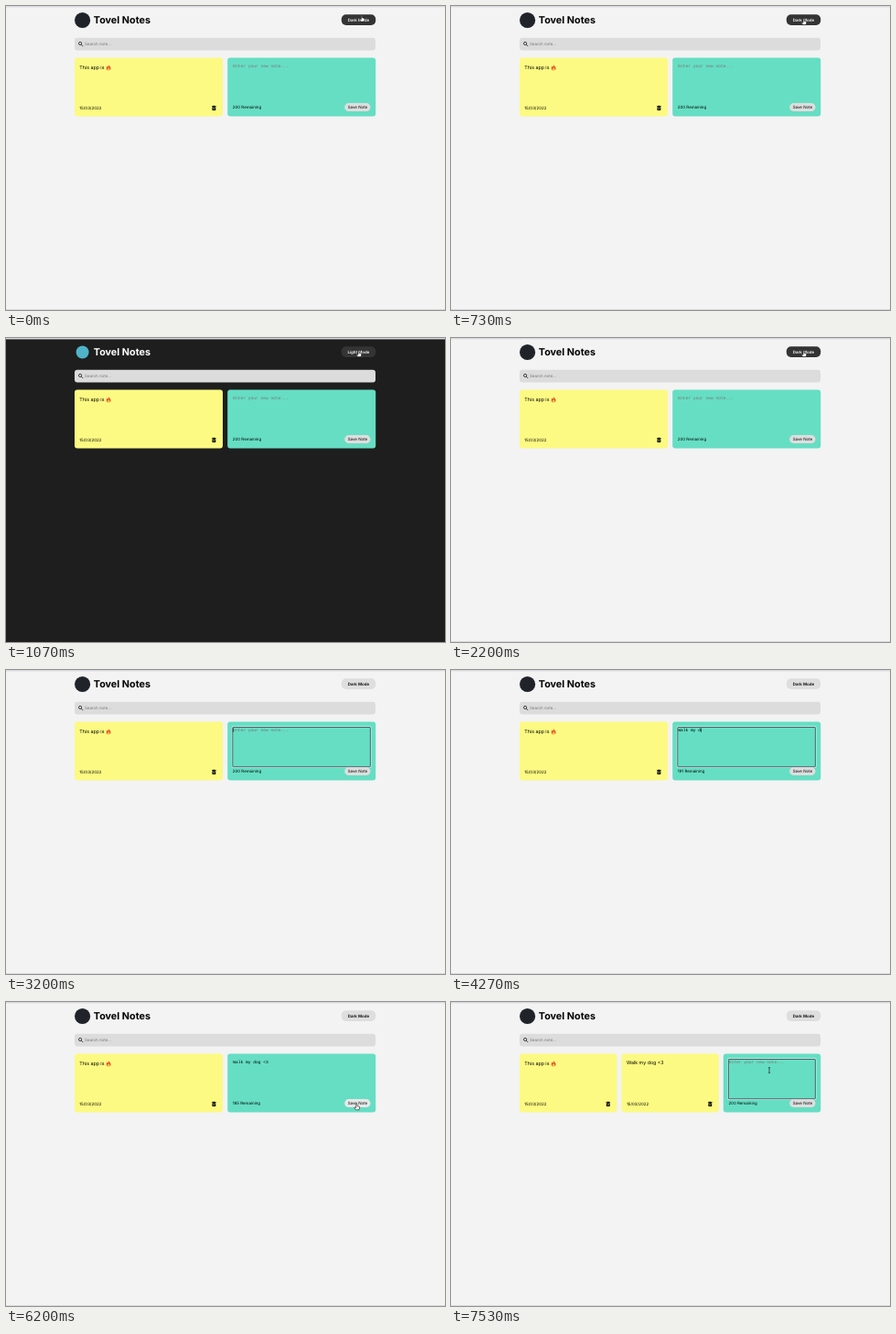
Recreate the animation shown at these times as an HTML page. Size 480 by 332 pixels, loop 8000 ms.

```html
<!DOCTYPE html>
<html lang="en">
<head>
<meta charset="utf-8">
<title>Notes</title>
<style>
  html, body { margin: 0; width: 100%; height: 100%; overflow: hidden; background: #f3f3f3; }
  svg { display: block; width: 100%; height: 100%; --bg: #f3f3f3; --ink: #000; --logo: #20232a; --line: #dadade; }
  svg.dark { --bg: #1e1e1e; --ink: #fff; --logo: #4fb4c8; --line: #1e1e1e; }
  text { font: 4.45px Inter, sans-serif; text-rendering: geometricPrecision; white-space: pre; fill: #000; }
  .title { font-size: 10.8px; font-weight: 700; fill: var(--ink); }
  .mid { text-anchor: middle; }
  .bold { font-weight: 600; }
  .body { font-size: 5.3px; }
  .mono { font: 4.6px "Liberation Mono", monospace; }
  .hint { fill: #757575; }
  .bg { fill: var(--bg); }
  .pill { fill: #dedede; }
  .note { fill: #fcfa82; }
</style>
</head>
<body>
<svg id="app" viewBox="0 0 480 332" preserveAspectRatio="none">
  <defs>
    <g id="trash">
      <path d="M-2.3-2.1H-1L-.6-2.6H.6L1-2.1H2.3V-1.4H-2.3ZM-1.9-1H1.9V2.2Q1.9 2.8 1.3 2.8H-1.3Q-1.9 2.8-1.9 2.2Z"/>
      <path d="M-.8.1.8 1.7M.8.1-.8 1.7" stroke="#fcfa82" stroke-width=".55"/>
    </g>
    <g id="flame">
      <path d="M3.1 0C3.5 1.5 5.4 2.3 5.4 4.2C5.4 5.6 4.3 6.4 3 6.4C1.6 6.4.5 5.5.5 4.1C.5 3 1.1 2.5 1.3 1.6C1.8 1.9 2 2.3 2.1 2.7C2.8 2 3.2 1.1 3.1 0Z" fill="#e8532f"/>
      <path d="M3.2 3C3.5 3.8 4.3 4.1 4.3 5C4.3 5.8 3.7 6.2 3 6.2C2.2 6.2 1.7 5.7 1.7 5C1.7 4.5 2 4.2 2.1 3.9L2.6 4.3Q3.1 3.8 3.2 3Z" fill="#fbc04b"/>
    </g>
  </defs>

  <rect class="bg" width="480" height="332"/>
  <rect width="480" height="1.4" fill="#d9d9de"/>
  <rect y="331" width="480" height="1" fill="var(--line)"/>

  <circle id="logo" cx="83.6" cy="15.5" r="8.6" fill="var(--logo)"/>
  <text class="title" x="95.8" y="19.4">Tovel Notes</text>
  <rect id="modeBtn" class="pill" x="366.8" y="9.2" width="37.4" height="11.8" rx="5"/>
  <text id="modeText" class="mid bold" x="385.4" y="16.7"></text>

  <rect x="75" y="34.8" width="329" height="13.7" rx="3" fill="#dcdcdc"/>
  <g fill="none" stroke="#111" stroke-width=".75">
    <circle cx="81.1" cy="40.9" r="1.6"/>
    <path d="M82.3 42.1 84.3 44.1"/>
  </g>
  <text class="hint" x="86" y="43.2">Search note...</text>

  <g>
    <rect class="note" id="card1" x="75" y="56.6" height="63.9" rx="3"/>
    <text class="body" x="80.3" y="69.1">This app is</text>
    <use href="#flame" x="109.2" y="63.9"/>
    <text x="80.3" y="112.9">15/03/2022</text>
    <use href="#trash" id="bin1" y="111.3"/>
  </g>
  <g id="added">
    <rect class="note" x="186.4" y="56.6" width="106.4" height="63.9" rx="3"/>
    <text class="body" x="192" y="67.6">Walk my dog &lt;3</text>
    <text x="192" y="112.9">15/03/2022</text>
    <use href="#trash" x="283.3" y="111.3"/>
  </g>

  <rect id="card2" y="56.6" height="63.9" rx="3" fill="#66dec3"/>
  <g id="entry">
    <text id="typed" class="mono" x="6" y="67.1"></text>
    <rect id="caret" y="63.4" width=".6" height="4.6"/>
    <text id="left" x="5.6" y="112.2"></text>
  </g>
  <rect id="saveBtn" class="pill" x="370.2" y="106.1" width="28.3" height="9" rx="4.5"/>
  <text class="mid" x="384.4" y="112.1">Save Note</text>
  <g id="ring" fill="none">
    <rect id="ringOut" y="62.1" height="44" rx=".8" stroke="#fff" stroke-opacity=".65" stroke-width="1.5"/>
    <rect id="ringIn" y="62.5" height="43.2" rx=".5" stroke="#27333f" stroke-width=".75"/>
  </g>

  <g id="pointer" stroke-linejoin="round">
    <path id="arrow" d="M0 0V5.8L1.4 4.6 2.3 6.6 3.2 6.2 2.3 4.3H4.1Z" fill="#000" stroke="#fff" stroke-width=".5"/>
    <path id="hand" d="M-.6.5Q0-.4.6.5V2.4L2.7 2.9Q3.3 3.1 3.2 3.8L2.6 6.6H-.9L-2.5 4.3Q-2.5 3.4-1.6 3.7L-.6 4.4Z" fill="#fff" stroke="#111" stroke-width=".6"/>
    <path id="beam" d="M-1.1-3Q0-3 0-2.3Q0-3 1.1-3M0-2.3V2.3M-1.1 3Q0 3 0 2.3Q0 3 1.1 3" fill="none" stroke="#222" stroke-width=".7"/>
  </g>
</svg>
<script>
const LOOP = 8000;
const DARK = [870, 2200], SAVED = 6330;
const FOCUS = [[2930, 6130], [7030, LOOP]];
const HIDDEN = [3200, 5470];
const MESSAGE = "Walk my dog <3 ";
const KEYS = [3270, 3400, 3470, 3600, 3670, 3800, 3870, 4000, 4200, 4330, 4400, 4530, 4930, 5070, 5200];
// pointer path: time, x, y
const PATH = [
  [70, 389, 10.5], [470, 385.6, 14], [2260, 385.6, 14], [2930, 369, 80],
  [5470, 369, 80], [5780, 395, 98], [6100, 383.4, 111.2], [6420, 383.4, 111.2], [7000, 348, 74.5]
];

const $ = id => document.getElementById(id);
const set = (id, attrs) => { for (const k in attrs) $(id).setAttribute(k, attrs[k]); };
const show = (id, on) => { $(id).style.display = on ? "" : "none"; };
const within = (t, [a, b]) => t >= a && t < b;
const inBox = (p, x, y, w, h) => p.x >= x && p.x <= x + w && p.y >= y && p.y <= y + h;

function pointerAt(t) {
  let i = PATH.findIndex(k => k[0] > t);
  if (i === 0) return { x: PATH[0][1], y: PATH[0][2] };
  if (i < 0) i = PATH.length - 1;
  const [t0, x0, y0] = PATH[i - 1], [t1, x1, y1] = PATH[i];
  const u = Math.min(1, (t - t0) / (t1 - t0));
  const e = u * u * (3 - 2 * u);
  return { x: x0 + (x1 - x0) * e, y: y0 + (y1 - y0) * e };
}

function drawCards(t) {
  const saved = t >= SAVED;
  const width = saved ? 106.4 : 162;
  const x = 404.2 - width;
  const count = saved ? 0 : KEYS.filter(k => k <= t).length;
  const focus = FOCUS.find(f => within(t, f));

  set("card1", { width });
  set("bin1", { x: 75 + width - 9.6 });
  show("added", saved);
  set("card2", { x, width });
  set("entry", { transform: `translate(${x} 0)` });
  $("typed").textContent = count ? MESSAGE.slice(0, count) : "Enter your new note...";
  $("typed").classList.toggle("hint", !count);
  $("left").textContent = `${200 - count} Remaining`;

  show("ring", focus);
  set("ringOut", { x: x + 5.2, width: width - 10.6 });
  set("ringIn", { x: x + 5.6, width: width - 11.4 });
  const since = focus ? t - (count ? KEYS[count - 1] : focus[0]) : 0;
  show("caret", focus && since % 1000 < 500);
  set("caret", { x: 6 + count * 2.76 });
  return x;
}

function drawPointer(t, cardX) {
  const p = pointerAt(t);
  const onMode = inBox(p, 366.8, 9.2, 37.4, 11.8);
  const onSave = inBox(p, 370.2, 106.1, 28.3, 9);
  const onText = inBox(p, cardX + 5, 62, 399 - cardX - 5, 44);
  set("pointer", { transform: `translate(${p.x} ${p.y})` });
  show("pointer", !within(t, HIDDEN));
  show("hand", onMode || onSave);
  show("beam", onText && !onSave);
  show("arrow", !onMode && !onSave && !onText);
  $("modeBtn").style.fill = onMode ? "#343434" : "";
  $("modeText").style.fill = onMode ? "#fff" : "";
  $("saveBtn").style.fill = onSave ? "#e8e8e8" : "";
}

function draw(t) {
  const dark = within(t, DARK);
  $("app").classList.toggle("dark", dark);
  set("logo", { r: dark ? 7 : 8.6 });
  $("modeText").textContent = dark ? "Light Mode" : "Dark Mode";
  drawPointer(t, drawCards(t));
}

let start;
function tick(now) {
  start ??= now;
  draw((now - start) % LOOP);
  requestAnimationFrame(tick);
}
draw(0);
requestAnimationFrame(tick);
</script>
</body>
</html>
```
